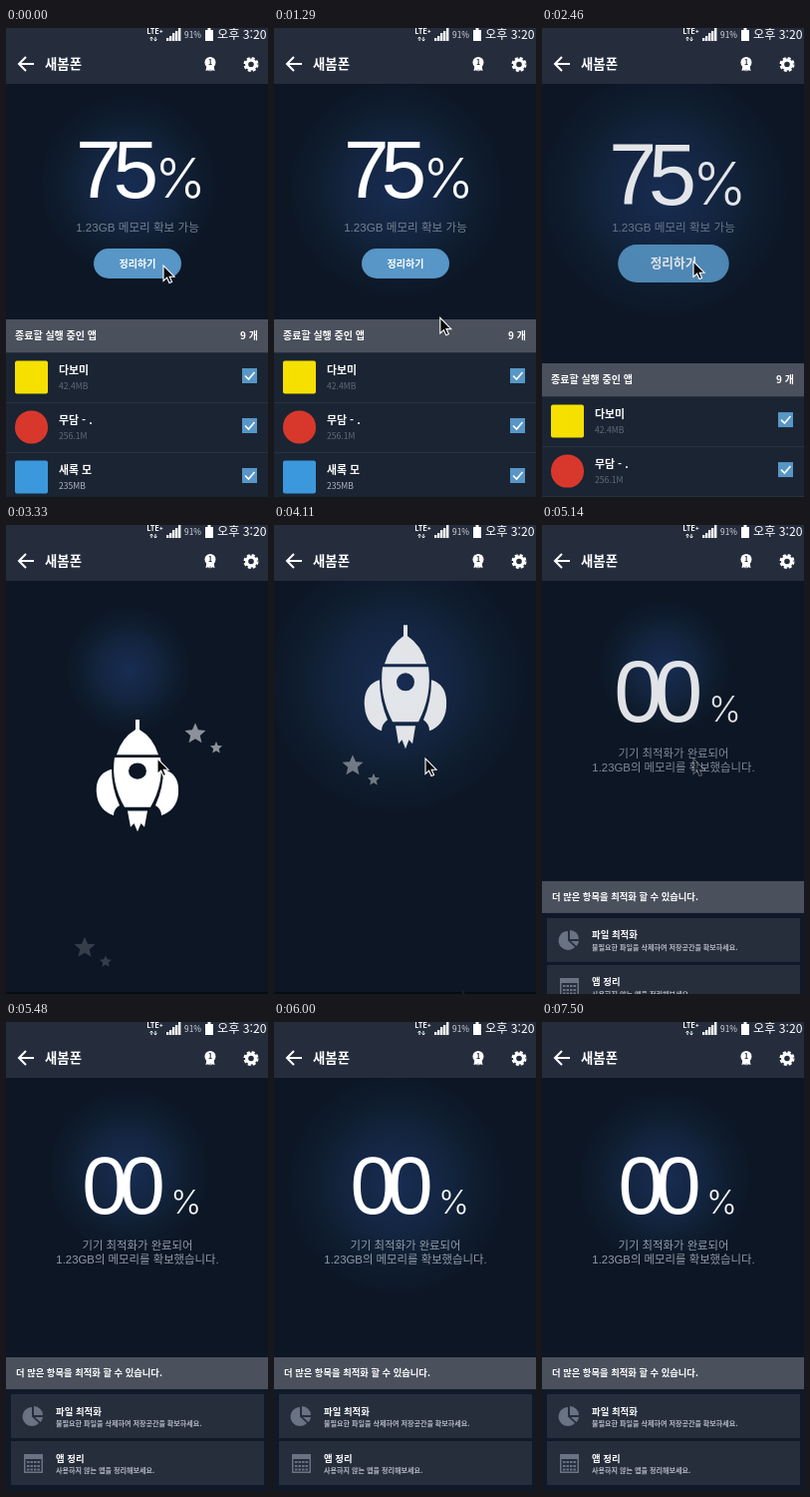
An HTML page for the animation above (7780 ms loop, 263 by 470 pixels).

```html
<!DOCTYPE html>
<html lang="ko">
<head>
<meta charset="utf-8">
<style>
html, body { margin: 0; width: 100%; height: 100%; overflow: hidden; background: #0c1624; }
svg { display: block; width: 263px; height: 470px; font-family: "Noto Sans CJK KR", "Noto Sans CJK", sans-serif; fill: #fff; }
.num { font-family: "Liberation Sans", "Noto Sans CJK KR", "Noto Sans CJK", sans-serif; }
.thin { font-family: Inter, sans-serif; font-weight: 300; letter-spacing: 0; }
.b { font-weight: 700; }
.m { font-weight: 500; }
.c { text-anchor: middle; }
.line { fill: none; stroke: #fff; stroke-width: 2; }
</style>
</head>
<body>
<svg viewBox="0 0 263 470">
  <defs>
    <radialGradient id="light">
      <stop offset="0" stop-color="#182d54"/>
      <stop offset=".5" stop-color="#152947" stop-opacity=".75"/>
      <stop offset=".8" stop-color="#142840" stop-opacity=".32"/>
      <stop offset="1" stop-color="#142840" stop-opacity=".1"/>
    </radialGradient>
    <path id="star" d="M0-11 3-4 10.5-3.4 4.8 1.6 6.5 9 0 5-6.5 9-4.8 1.6-10.5-3.4-3-4Z"/>
    <g id="stars" fill="#d3d6da">
      <use href="#star"/>
      <use href="#star" transform="translate(21 14) scale(.58)"/>
    </g>
  </defs>
  <rect width="263" height="470" fill="#0c1624"/>
  <circle id="glow" fill="url(#light)"/>
  <rect y="468" width="263" height="2" fill="#070d17"/>

  <g id="before">
    <g id="percent" class="num">
      <text x="70" y="169.500" font-size="82" letter-spacing="-8">75</text>
      <text class="thin c" x="175" y="169.500" font-size="55">%</text>
    </g>
    <text class="num c" x="132" y="204" font-size="11.6" fill="#748193">1.23GB 메모리 확보 가능</text>
    <g id="button">
      <rect x="-44" y="-15" width="88" height="30" rx="15" fill="#5796c6"/>
      <text class="c b" y="3.500" font-size="10">정리하기</text>
    </g>
  </g>
  <g id="list">
    <rect y="292" width="263" height="180" fill="#1a2433"/>
    <rect y="292" width="263" height="33" fill="#4a505c"/>
    <text class="b" x="9" y="312" font-size="10">종료할 실행 중인 앱</text>
    <text class="b" x="253" y="312" font-size="10" text-anchor="end">9 개</text>
    <g id="rows"></g>
  </g>

  <use id="starsL" href="#stars"/>
  <use id="starsR" href="#stars"/>
  <g id="rocket">
    <path d="M130 0h4v11Q148 20 153 39H111Q116 20 130 11Z"/>
    <path fill-rule="evenodd" d="M109 42H155Q159 70 145 97H119Q105 70 109 42ZM123 57a9 9 0 0 0 18 0a9 9 0 0 0-18 0Z"/>
    <path id="fin" d="M106 55C93 59 90 70 91 82C92 95 99 103 108 106Q108 99 114 95Q106 76 106 55Z"/>
    <use href="#fin" transform="matrix(-1 0 0 1 264 0)"/>
    <path d="M122 101H142L139 119 135.500 115 132 124 128.500 115 125 119Z"/>
  </g>

  <g id="after">
    <g id="zero" class="num">
      <text x="76.500" y="191.500" font-size="82" letter-spacing="-8">00</text>
      <text class="thin c" x="180.500" y="191.500" font-size="33">%</text>
    </g>
    <g id="message" class="num c" font-size="11.4" fill="#929ba8">
      <text x="132" y="228">기기 최적화가 완료되어</text>
      <text x="132" y="242">1.23GB의 메모리를 확보했습니다.</text>
    </g>
  </g>
  <g id="panel">
    <rect y="336" width="263" height="140" fill="#101927"/>
    <rect y="336" width="263" height="32" fill="#4a505c"/>
    <text class="b" x="10" y="355" font-size="9.3">더 많은 항목을 최적화 할 수 있습니다.</text>
    <g fill="#262e3c">
      <rect x="5" y="373" width="254" height="44"/>
      <rect x="5" y="420" width="254" height="44"/>
    </g>
    <g fill="#697384">
      <path d="M26 386A9.500 9.500 0 1 0 33 402L26 395.500ZM28 385V394H37A9 9 0 0 0 28 385ZM29 396 34.500 401A9 9 0 0 0 37 396Z"/>
      <path fill-rule="evenodd" d="M18 433H37V452H18ZM19.500 438V450.500H35.500V438Z"/>
      <path d="M21 441h13M21 445h13M21 448.500h13" stroke="#697384" stroke-width="2" stroke-dasharray="2.500 1"/>
    </g>
    <g class="b" font-size="9.4">
      <text x="50" y="393.500">파일 최적화</text>
      <text x="50" y="440.500">앱 정리</text>
    </g>
    <g class="b" font-size="7.07" fill="#b4bac3">
      <text x="50" y="405">불필요한 파일을 삭제하여 저장공간을 확보하세요.</text>
      <text x="50" y="452">사용하지 않는 앱을 정리해보세요.</text>
    </g>
  </g>

  <rect width="263" height="56" fill="#252d3d"/>
  <text class="b" x="141.500" y="6" font-size="7" font-family="Inter, sans-serif">LTE<tspan dy="-1" font-size="6">+</tspan></text>
  <path d="M146 13V9M144.500 10.500 146 9 147.500 10.500M150 9V13M148.500 11.500 150 13 151.500 11.500" class="line" style="stroke-width:1"/>
  <path d="M161 13v-3h2.400v3zM164 13V8h2.400v5zM167 13V5h2.400v8zM170 13V3h2.400v10zM173 13V0h2.400v13zM200 2h2.500V0h3V2H208V13H200Z"/>
  <text x="179" y="10" font-size="8.4" fill="#d5d8dd">91%</text>
  <text x="212" y="11" font-size="12.2">오후 3:20</text>
  <path class="line" d="M28 36H13M20 29 13 36 20 43"/>
  <text class="b" x="39" y="41" font-size="13.4">새봄폰</text>
  <path d="M201.500 37 200.500 43 203 42.300 204.300 43.500 205 41 205.700 43.500 207 42.300 209.500 43 208.500 37Z"/>
  <circle cx="205" cy="34.500" r="5.500"/>
  <text class="b c" x="205" y="37" font-size="7" style="fill:#252d3d">1</text>
  <circle cx="246" cy="36.500" r="4.400" class="line" style="stroke-width:3.200"/>
  <circle cx="246" cy="36.500" r="6.400" class="line" stroke-dasharray="3 2.027" style="stroke-width:2.200"/>

  <path id="cursor" d="M0 0V15.500L3.600 12.200 6 17.500 8.600 16.400 6.200 11.200H11Z" fill="#0a0a0c" stroke="#fff" stroke-width="1.100"/>
</svg>
<script>
const LOOP = 7780;
const el = id => document.getElementById(id);
const set = (id, attrs) => { for (const k in attrs) el(id).setAttribute(k, attrs[k]); };
const ramp = (t, a, b) => Math.min(1, Math.max(0, (t - a) / (b - a)));
const smooth = x => x * x * (3 - 2 * x);
const easeOut = (x, n) => 1 - (1 - x) ** n;
const mix = (a, b, p) => a + (b - a) * p;
const zoom = (x, y, s) => `translate(${x} ${y}) scale(${s}) translate(${-x} ${-y})`;

const apps = [
  ['다보미', '42.4MB', '#f6e000', 2],
  ['무담 - .', '256.1M', '#d8382c', 16],
  ['새록 모', '235MB', '#3b98dc', 2]
];
el('rows').innerHTML = apps.map(([name, size, color, round], i) => `
  <g transform="translate(0 ${325 + 50 * i})">
    <rect width="263" height="1" fill="#283140"/>
    <rect x="9" y="8.500" width="33" height="33" rx="${round}" fill="${color}"/>
    <text class="b" x="53" y="22" font-size="10.9">${name}</text>
    <text x="53" y="37" font-size="8.6" fill="${i < 2 ? '#626b79' : '#b2b8c1'}">${size}</text>
    <rect x="237" y="16" width="15" height="15" fill="#5796c6"/>
    <path class="line" d="M240 23.500 243.500 27 249.500 20" style="stroke-width:1.600"/>
  </g>`).join('');

// time, centre y, radius
const pulse = [[0, 157, 88], [2460, 165, 122], [3330, 145, 62], [4110, 158, 128],
  [5140, 142, 65], [6000, 163, 108], [7500, 157, 85], [LOOP, 157, 88]];

function drawGlow(t) {
  const i = pulse.findIndex(k => k[0] > t);
  const [a, b] = [pulse[i - 1], pulse[i]];
  const p = smooth(ramp(t, a[0], b[0]));
  set('glow', { cx: 123, cy: mix(a[1], b[1], p), r: mix(a[2], b[2], p) });
}

function drawCursor(t) {
  const down = smooth(ramp(t, 720, 970));
  const up = smooth(ramp(t, 1120, 1500));
  let x = mix(158, 142, down), y = mix(238, 344, down);
  if (up > 0) {
    const q = 1 - up;
    x = q * q * 142 + 2 * q * up * 189 + up * up * 152;
    y = q * q * 344 + 2 * q * up * 275 + up * up * 234;
  }
  const press = t >= 1640 && t < 1770 ? .92 : 1;
  set('cursor', { transform: `translate(${x} ${y}) scale(${press})`, opacity: 1 - ramp(t, 4980, 5210) });
}

function drawStars(id, x, start, t) {
  const y = 40 + (t - start) * .92 % 450;
  const shown = t >= start && t < 4420;
  const fade = 1 - (y - 40) / 480;
  set(id, { transform: `translate(${x} ${y})`, opacity: shown ? fade * (1 - ramp(t, 4060, 4420)) : 0 });
}

function drawRocket(t) {
  const enter = easeOut(ramp(t, 2700, 3210), 3);
  const rise = smooth(ramp(t, 3330, 4060));
  const leave = ramp(t, 4060, 4480);
  const y = mix(480, 195, enter) - 91 * rise - 250 * leave ** 2;
  set('rocket', { transform: `translate(0 ${y}) scale(1 ${mix(.905, 1, rise)})`, opacity: t < 2700 ? 0 : 1 - leave });
}

function draw(t) {
  drawGlow(t);
  const out = t < 2460 ? 0 : easeOut(ramp(t, 2400, 2860), 2);
  set('before', { opacity: 1 - out ** 1.5 });
  set('percent', { transform: zoom(120, 45, 1 + .25 * out) });
  set('button', { transform: `translate(132 236) scale(${1 + 1.08 * out})` });
  set('list', { transform: `translate(0 ${178 * out})` });

  drawStars('starsL', 79, 2914, t);
  drawStars('starsR', 190, 3147, t);
  drawRocket(t);

  const unsettled = 1 - easeOut(ramp(t, 4850, 5700), 3);
  set('after', { opacity: ramp(t, 4800, 5190) });
  set('zero', { transform: zoom(137, 106, 1 + .245 * unsettled) });
  set('message', { transform: `translate(0 ${17.5 * unsettled})` });
  set('panel', { transform: `translate(0 ${134 * (1 - easeOut(ramp(t, 4850, 5480), 3))})` });
  drawCursor(t);
}

const origin = performance.now();
(function tick() {
  draw((performance.now() - origin) % LOOP);
  requestAnimationFrame(tick);
})();
</script>
</body>
</html>
```
